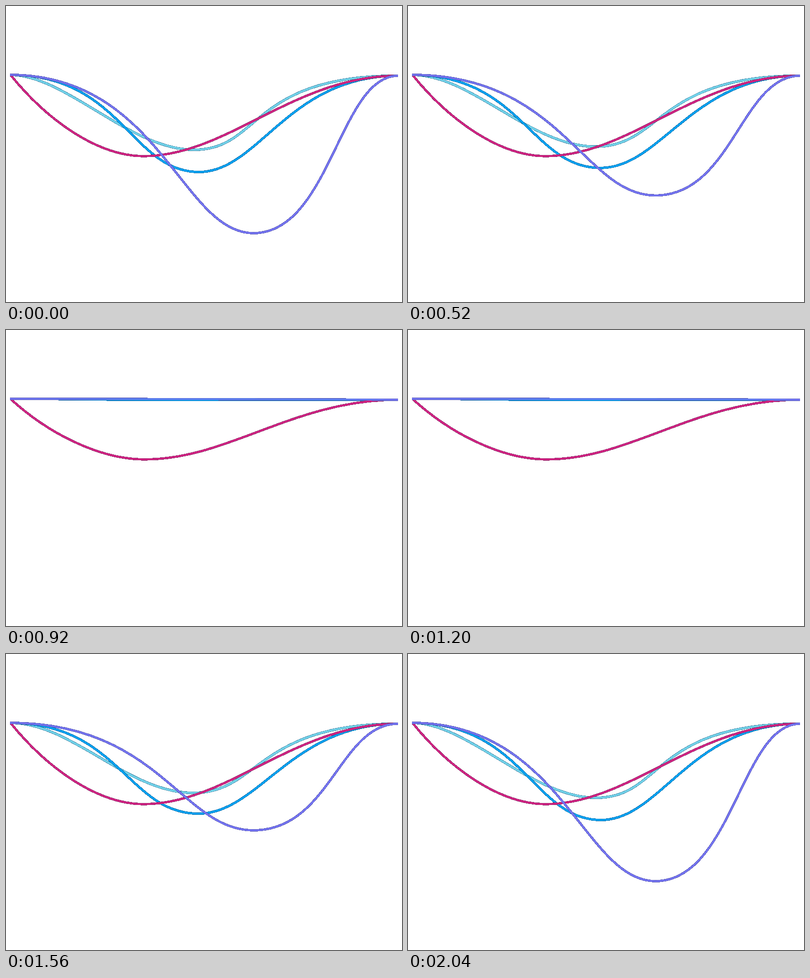
An HTML page for the animation above (2.16 s loop, 800 by 600 pixels).

```html
<!DOCTYPE html>
<html lang="en">
<head>
<meta charset="utf-8">
<title>Strings</title>
<style>
  html, body { margin: 0; width: 100%; height: 100%; overflow: hidden; background: #fff; }
  svg { display: block; width: 100vw; height: 100vh; }
  path { fill: none; }
  .edge { shape-rendering: crispEdges; }
</style>
</head>
<body>
<svg id="stage" viewBox="0 0 800 600">
  <defs>
    <linearGradient id="violet" gradientUnits="userSpaceOnUse" x1="8" y1="0" x2="792" y2="0">
      <stop offset="0" stop-color="#7575f5"/>
      <stop class="blend" offset=".3"/>
      <stop class="blend" offset=".85"/>
      <stop offset="1" stop-color="#7575f5"/>
    </linearGradient>
  </defs>
</svg>
<script>
const STEP = 40, STEPS = 54;
const START_Y = 139.5, END_X = 792, END_Y = 141.3;
const middleKeys = [[9, 0], [14, .066], [17, .22], [22.2, 1]];

// handles: [start out, low point in, low point out, end in], slack to taut
const strings = [
  { core: '#74d6ec', edge: '#3f83a5', width: 5.2, startX: 8, low: [380, 291.5], taut: [360, 140.8],
    slackHandles: [113, 130, 135, 300], tautHandles: [320, 190, 100, 80], dip: 0, keys: middleKeys },
  { core: '#00a4f4', edge: '#0c6ca8', width: 5, startX: 8, low: [390, 336.5], taut: [370, 141.8],
    slackHandles: [226, 138, 121, 222], tautHandles: [130, 190, 140, 120], dip: 0, keys: middleKeys },
  { core: '#d52284', edge: '#882a66', width: 4.8, startX: 9, low: [278, 304.3], taut: [287, 140.2],
    slackHandles: [74, 93, 170, 210], tautHandles: [74, 93, 170, 210], dip: 92,
    keys: [[17, 0], [23, .256], [26, 1]] },
  { core: 'url(#violet)', edge: '#5858b4', width: 4.8, startX: 8, low: [500, 460.5], taut: [500, 140.2],
    slackHandles: [303, 145, 155, 118], tautHandles: [303, 145, 155, 118], dip: 0,
    keys: [[2, 0], [9, .072], [14, .322], [17, .866], [17.5, 1]] }
];

const stage = document.getElementById('stage');
const blendStops = document.querySelectorAll('.blend');
const mix = (a, b, f) => a + (b - a) * f;

function addPath(kind, color, width) {
  const path = document.createElementNS('http://www.w3.org/2000/svg', 'path');
  path.setAttribute('class', kind);
  path.setAttribute('stroke', color);
  path.setAttribute('stroke-width', width);
  return stage.appendChild(path);
}

for (const s of strings) {
  s.paths = [addPath('edge', s.edge, s.width), addPath('core', s.core, s.width - 1.6)];
}

// Smooth rising curve through the keys, tangents from the geometric mean of slopes
function ease(keys, x) {
  const last = keys.length - 1;
  if (x <= keys[0][0]) return keys[0][1];
  if (x >= keys[last][0]) return keys[last][1];
  const slope = i => (keys[i + 1][1] - keys[i][1]) / (keys[i + 1][0] - keys[i][0]);
  const tangent = i => i === 0 ? 0 : i === last ? slope(i - 1) : Math.sqrt(slope(i - 1) * slope(i));
  let i = 0;
  while (x > keys[i + 1][0]) i++;
  const [x0, y0] = keys[i], [x1, y1] = keys[i + 1];
  const h = x1 - x0, t = (x - x0) / h, u = 1 - t;
  return y0 * u * u * (1 + 2 * t) + y1 * t * t * (3 - 2 * t)
    + h * t * u * (tangent(i) * u - tangent(i + 1) * t);
}

function shape(s, f) {
  const [a, b, c, d] = s.slackHandles.map((v, i) => mix(v, s.tautHandles[i], f));
  const x = mix(s.low[0], s.taut[0], f), y = mix(s.low[1], s.taut[1], f);
  return `M${s.startX} ${START_Y}C${s.startX + a} ${START_Y + s.dip * (1 - f)} ${x - b} ${y} ${x} ${y}`
    + `C${x + c} ${y} ${END_X - d} ${END_Y} ${END_X} ${END_Y}`;
}

function draw(time) {
  const step = Math.floor(time / STEP) % STEPS;
  const pose = Math.min(step, STEPS - 1 - step);
  for (const s of strings) {
    const d = shape(s, ease(s.keys, pose));
    s.paths.forEach(path => path.setAttribute('d', d));
  }
  const overlap = ease(middleKeys, pose) ** 4;
  const color = `rgb(${mix(117, 92, overlap)}, ${mix(117, 131, overlap)}, 245)`;
  blendStops.forEach(stop => stop.setAttribute('stop-color', color));
}

let origin;
function tick(now) {
  origin ??= now;
  draw(now - origin);
  requestAnimationFrame(tick);
}
draw(0);
requestAnimationFrame(tick);
</script>
</body>
</html>
```
